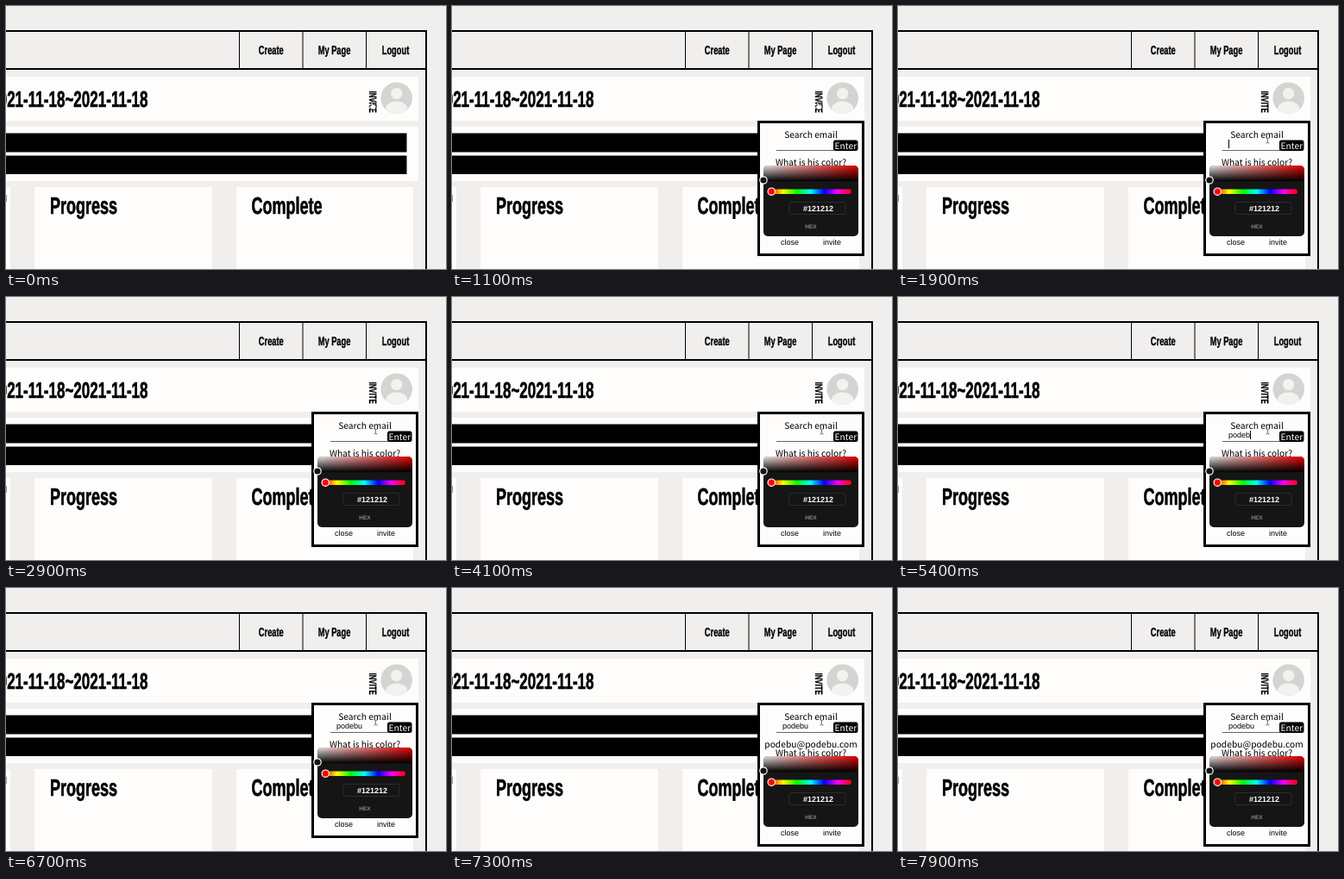
Write an HTML page that moves like this. It is 510 by 305 pixels and loops after 8 s.

```html
<!DOCTYPE html>
<html lang="en">
<head>
<meta charset="utf-8">
<title>Invite dialog</title>
<style>
  html, body { margin: 0; width: 100%; height: 100%; overflow: hidden; background: #f0efed; }
  svg { display: block; width: 510px; height: 305px; }
  text { text-rendering: geometricPrecision; }
  .display { font: bold 14.2px "Liberation Sans", Arial, sans-serif; stroke: #000; stroke-width: .025em; }
  .date { font-size: 26px; }
  .title { font-size: 27.5px; }
  .side { font-size: 12px; }
  .label { font: 10.25px "Noto Sans CJK KR", "Noto Sans CJK JP", "Noto Sans", sans-serif; text-anchor: middle; }
  .plain { font: 9px "Liberation Sans", Arial, sans-serif; }
  .code { font-weight: bold; text-anchor: middle; }
  .hex { font-size: 6.5px; }
  .panel { fill: #fefdfc; }
  .knob { stroke: #fff; stroke-width: 1.2; }
</style>
</head>
<body>
<svg viewBox="0 0 510 305">
  <defs>
    <linearGradient id="tint"><stop stop-color="#fff"/><stop offset="1" stop-color="#f00"/></linearGradient>
    <linearGradient id="shade" x2="0" y2="1"><stop stop-opacity=".12"/><stop offset="1"/></linearGradient>
    <linearGradient id="hue"></linearGradient>
    <clipPath id="round"><rect x="361" y="185" width="110" height="82" rx="5"/></clipPath>
    <clipPath id="face"><circle cx="452.7" cy="106.7" r="18.3"/></clipPath>
  </defs>

  <!-- Page -->
  <path d="M0 29H487V305M0 73H487" fill="none" stroke="#000" stroke-width="2"/>
  <path d="M270.5 30V72M344 30V72M417.5 30V72" stroke="#000"/>
  <g class="panel">
    <rect y="82" width="478" height="51"/>
    <rect y="140" width="478" height="63"/>
    <rect y="210" width="5" height="95"/>
    <rect x="33" y="210" width="206" height="95"/>
    <rect x="267" y="210" width="205" height="95"/>
  </g>
  <path d="M0 147.5H464.5V169.5H0ZM0 173.5H464.5V195H0Z"/>
  <rect y="219" width="1" height="8" fill="#999"/>
  <g id="headings"></g>
  <g clip-path="url(#face)">
    <rect x="434" y="88" width="38" height="38" fill="#d4d4d3"/>
    <g fill="#f2f2f1">
      <circle cx="452.7" cy="101.5" r="6.6"/>
      <ellipse cx="452.7" cy="119" rx="12.5" ry="8.5"/>
    </g>
  </g>

  <!-- Invite dialog -->
  <g id="dialog">
    <rect id="box" class="panel" x="355.5" y="134.5" width="121" height="154" stroke="#000" stroke-width="3"/>
    <text class="label" x="416" y="153">Search email</text>
    <path d="M376 167.5H443" stroke="#666"/>
    <text id="typed" class="plain" x="383" y="163"></text>
    <rect id="caret" y="155" width="1" height="10"/>
    <rect x="442" y="155.5" width="28.5" height="12.5" rx="2.5"/>
    <text class="label" x="456.3" y="165.7" fill="#fff">Enter</text>
    <text id="result" class="label" x="416" y="184.7">podebu@podebu.com</text>
    <g id="lower">
      <text class="label" x="416" y="184.7">What is his color?</text>
      <g clip-path="url(#round)">
        <rect x="361" y="185" width="110" height="82" fill="#151515"/>
        <rect x="361" y="185" width="110" height="18" fill="url(#tint)"/>
        <rect x="361" y="185" width="110" height="18.2" fill="url(#shade)"/>
      </g>
      <rect x="368" y="212.5" width="95" height="5.5" rx="2.7" fill="url(#hue)"/>
      <circle class="knob" cx="361" cy="202" r="4.2" fill="#121212"/>
      <circle class="knob" cx="370.3" cy="215.2" r="4.2" fill="#f00"/>
      <rect x="391" y="227.5" width="65" height="14" rx="2" fill="none" stroke="#333" stroke-width=".8"/>
      <text class="plain code" x="424.5" y="238.2" fill="#fff">#121212</text>
      <text class="plain code hex" x="416" y="257.5" fill="#888">HEX</text>
      <text class="plain" x="381" y="277">close</text>
      <text class="plain" x="430" y="277">invite</text>
    </g>
  </g>

  <!-- Pointer shapes, drawn around 0,0 -->
  <g id="pointer">
    <path id="hand" d="M-2 -4Q-1 -5 0 -4V-1L3 0Q4 0 4 2L3 5H-2L-4 1Q-4 0 -2 1Z" fill="#fff" stroke="#000" stroke-width=".7"/>
    <path id="arrow" d="M-2 -4V4L0 2.3 1.2 5 2.4 4.5 1.3 2H3.8Z" stroke="#fff" stroke-width=".6"/>
    <path id="beam" d="M-2 -3Q0 -3 0 -2Q0 -3 2 -3M0 -2V2M-2 3Q0 3 0 2Q0 3 2 3" fill="none" stroke="#555" stroke-width=".8"/>
  </g>
</svg>
<script>
const LOOP = 8000, TICK = 100;
const WORD = 'podebu';
const CONDENSE = 0.655; // one width for the whole display face
const $ = id => document.getElementById(id);
const show = (id, visible) => { $(id).style.display = visible ? '' : 'none'; };
const within = (t, [from, to]) => t >= from && t < to;

function heading(text, x, y, kind = '', anchor = 'start', turn = 0) {
  $('headings').insertAdjacentHTML('beforeend',
    `<text class="display ${kind}" text-anchor="${anchor}"
      transform="translate(${x} ${y}) rotate(${turn}) scale(${CONDENSE} 1)">${text}</text>`);
}
heading('Create', 307.3, 56, '', 'middle');
heading('My Page', 380.5, 56, '', 'middle');
heading('Logout', 451.5, 56, '', 'middle');
heading('2021-11-18~2021-11-18', 164.5, 116.5, 'date', 'end');
heading('Progress', 51, 241, 'title');
heading('Complete', 284.5, 241, 'title');
heading('INVITE', 421.3, 98.5, 'side', 'start', 90);

$('hue').innerHTML = Array.from({ length: 7 }, (_, i) =>
  `<stop offset="${i / 6}" stop-color="hsl(${i * 60} 100% 50%)"/>`).join('');

const OPEN = 300, FOUND = 6800;
const keyTimes = [4600, 4800, 5000, 5200, 5400, 5500];
const caretTimes = [
  [1900, 2200], [2600, 2900], [3200, 3500], [3800, 4100],
  [4400, 6000], [6300, 6700], [6900, 7300], [7600, 7900]
];

function drawPointer(t) {
  const p = Math.min(1, Math.max(0, (t - 1200) / 600));
  const k = p * p * (3 - 2 * p);
  const x = 425 + 3.5 * k, y = 115 + 41 * k;
  $('pointer').setAttribute('transform', `translate(${x} ${y})`);
  show('hand', y < 124);
  show('arrow', y >= 124 && y < 144);
  show('beam', y >= 144);
}

function draw(t) {
  const letters = keyTimes.filter(time => t >= time).length;
  const grow = t >= FOUND ? 10 : 0;
  show('dialog', t >= OPEN);
  $('typed').textContent = WORD.slice(0, letters);
  $('caret').setAttribute('x', Math.floor(383 + letters * 5));
  show('caret', caretTimes.some(span => within(t, span)));
  show('result', grow > 0);
  $('box').setAttribute('height', 154 + grow);
  $('lower').setAttribute('transform', `translate(0 ${grow})`);
  drawPointer(t);
}

function frame() {
  draw(Math.floor(performance.now() % LOOP / TICK) * TICK);
  requestAnimationFrame(frame);
}
frame();
</script>
</body>
</html>
```
